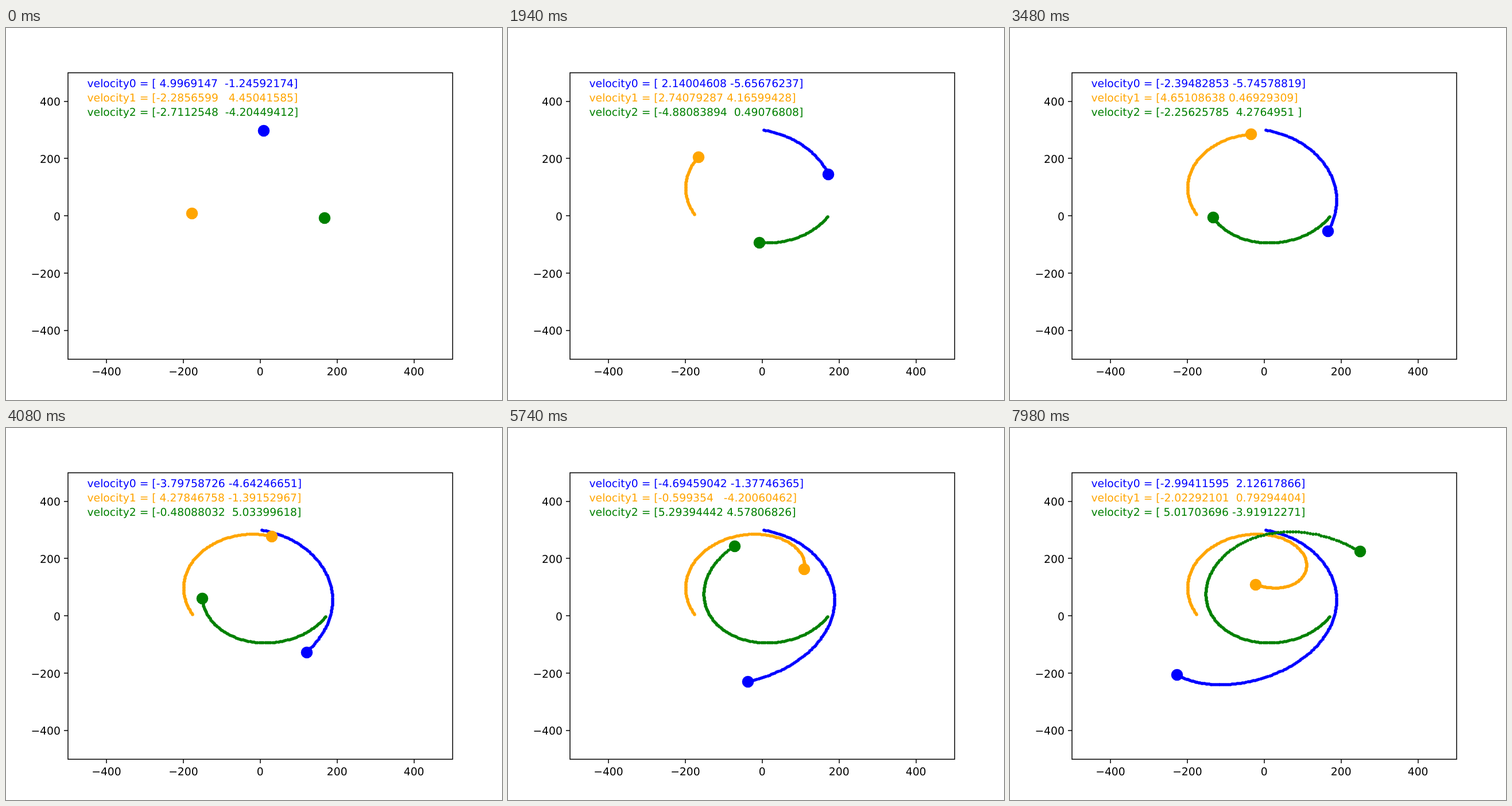
An HTML page with a canvas for the animation above (8000 ms loop, 864 px wide and 648 px high).

```html
<!DOCTYPE html>
<html lang="en">
<head>
<meta charset="utf-8">
<title>Three bodies</title>
<style>
  html, body { margin: 0; width: 100%; height: 100%; overflow: hidden; background: #fff; }
  canvas { display: block; }
</style>
</head>
<body>
<canvas id="stage" width="864" height="648"></canvas>
<script>
const ctx = document.getElementById('stage').getContext('2d');
const LOOP = 8000, STEPS = 173, GRAVITY = 8500;
const COLORS = ['#0000ff', '#ffa500', '#008000'];
const TICKS = [-400, -200, 0, 200, 400];

const toX = x => 442.8 + x * 0.6696;
const toY = y => 327.24 - y * 0.49896;

// Equal masses on an equilateral triangle, integrated with semi-implicit Euler.
function simulate() {
  const half = 100 * Math.sqrt(3), vy = 2.5 * Math.sqrt(3);
  let bodies = [
    { x: 0, y: 300, vx: 5, vy: -1 },
    { x: -half, y: 0, vx: -2.5, vy: vy },
    { x: half, y: 0, vx: -2.5, vy: -vy }
  ];
  const history = [bodies];
  for (let i = 0; i < STEPS; i++) {
    bodies = bodies.map(b => {
      let { vx, vy } = b;
      for (const other of bodies) {
        if (other === b) continue;
        const dx = other.x - b.x, dy = other.y - b.y;
        const pull = GRAVITY / Math.hypot(dx, dy) ** 3;
        vx += dx * pull;
        vy += dy * pull;
      }
      return { x: b.x + vx, y: b.y + vy, vx, vy };
    });
    history.push(bodies);
  }
  return history;
}
const history = simulate();

// Pads both numbers so that their decimal points line up.
function formatPair(values) {
  const parts = values.map(v => v.toFixed(8).replace(/0+$/, '').split('.'));
  const widest = k => Math.max(...parts.map(p => p[k].length));
  const left = widest(0), right = widest(1);
  return '[' + parts.map(p => p[0].padStart(left) + '.' + p[1].padEnd(right)).join(' ') + ']';
}

function line(x1, y1, x2, y2) {
  ctx.beginPath();
  ctx.moveTo(x1, y1);
  ctx.lineTo(x2, y2);
  ctx.stroke();
}

function text(string, x, y, align, color) {
  ctx.textAlign = align;
  ctx.fillStyle = color;
  ctx.fillText(string, x, y);
}

// Marker centres sit on whole pixels.
function dot(body, radius, color) {
  ctx.fillStyle = color;
  ctx.beginPath();
  ctx.arc(Math.round(toX(body.x)), Math.round(toY(body.y)), radius, 0, 2 * Math.PI);
  ctx.fill();
}

function drawAxes() {
  ctx.strokeStyle = '#000';
  ctx.lineWidth = 1.5;
  ctx.strokeRect(108, 78, 670, 499);
  for (const value of TICKS) {
    const label = String(value).replace('-', '\u2212');
    const x = Math.round(toX(value)), y = Math.round(toY(value));
    line(x, 577, x, 584);
    line(101, y, 108, y);
    text(label, toX(value), 605, 'center', '#000');
    text(label, 94.9, Math.round(toY(value) + 7.5), 'right', '#000');
  }
}

// Three steps every 140 ms, held for 20, 100 and 20 ms.
function stepAt(time) {
  const rest = time % 140;
  return 2 + 3 * Math.floor(time / 140) + (rest >= 20) + (rest >= 120);
}

function draw(now) {
  const step = stepAt(now % LOOP);
  ctx.fillStyle = '#fff';
  ctx.fillRect(0, 0, 864, 648);
  ctx.font = '18.75px "DejaVu Sans", sans-serif';
  ctx.textRendering = 'geometricPrecision';

  COLORS.forEach((color, k) => {
    for (let i = 1; i <= step; i++) dot(history[i][k], 2.8, color);
  });
  history[step].forEach((body, k) => dot(body, 10.3, COLORS[k]));
  drawAxes();
  history[step].forEach((body, k) => {
    const label = `velocity${k} = ${formatPair([body.vx, body.vy])}`;
    text(label, 141.5, 103 + 25 * k, 'left', COLORS[k]);
  });
  requestAnimationFrame(draw);
}
requestAnimationFrame(draw);
</script>
</body>
</html>
```
